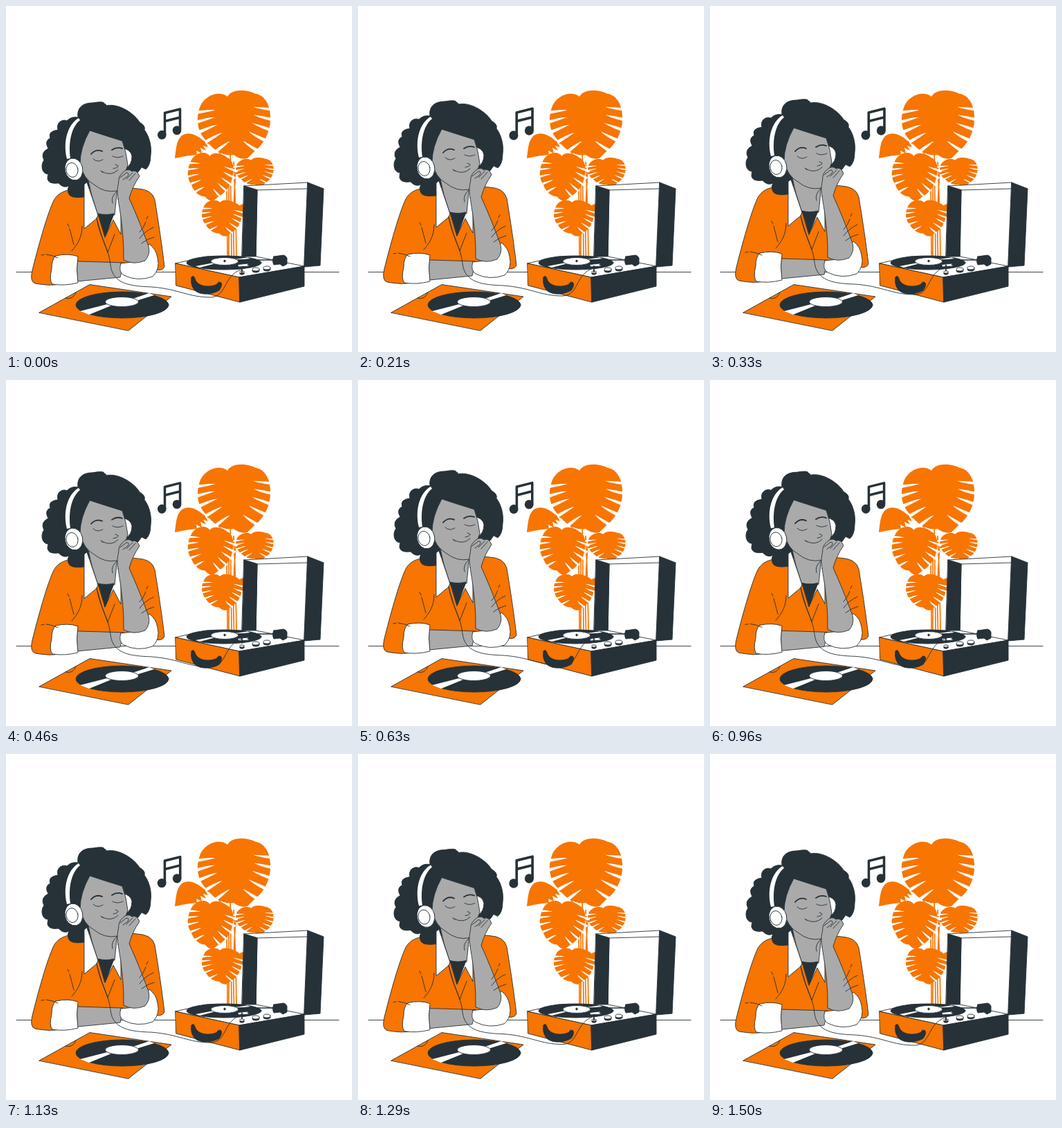
These frames come from a looping animation (500 by 500 pixels, 1540 ms). An HTML page:

```html
<!DOCTYPE html>
<html lang="en">
<head>
<meta charset="utf-8">
<title>Listening to records</title>
<style>
  html, body { margin: 0; width: 100%; height: 100%; overflow: hidden; background: #fff; }
  svg { display: block; width: 100%; height: 100%; }
  .ink { fill: #263238; }
  .white { fill: #fff; }
  .orange { fill: #f77500; }
  .skin { fill: #aaa; }
  .line { fill: none; }
  .art { stroke: #263238; stroke-width: .9; stroke-linejoin: round; stroke-linecap: round; }
  .plain { stroke: none; }
  .stem { fill: none; stroke: #f77500; stroke-width: 1.7; }
</style>
</head>
<body>
<svg viewBox="0 0 500 500">
  <g id="plant">
    <path class="stem" d="M324 205Q325 290 326 362M318 225Q320 290 320 362M329 225Q332 290 333 362M332 240Q327 300 329.500 362M322 250V362M282 195Q303 199 312 218"/>
    <path class="orange" d="M244 220C246 206 246 192 256 186Q265 182 274 187Q287 193 292 204L285 202L289 209L281 205L283 213L275 209L276 215Q262 216 244 220ZM335 289L345 285V307Q337 304 335 289Z"/>
  </g>

  <g class="art">
    <path class="line" d="M15 384.500H481"/>

    <g id="turntable">
      <path class="white" d="M344 260L436 255V264L431 377L361 366L363 266Z"/>
      <path class="line" d="M363 266L436 264"/>
      <path class="ink" d="M344 260L363 266L361 367L341 364ZM436 255L459 264L454 375L431 377Z"/>
      <path class="white" d="M245 372L337 392L431 376L361 362H290Z"/>
      <path class="orange" d="M245 372L337 392L338 428L246 404Z"/>
      <path class="ink" d="M337 392L431 376V405L338 428Z"/>
      <ellipse class="ink" cx="315" cy="371" rx="54" ry="10"/>
      <path class="white plain" d="M274 376L300 371L303 372L280 378ZM331 366L349 363.500L353 365L334 367Z"/>
      <ellipse class="white" cx="316" cy="369" rx="20" ry="5.500"/>
      <ellipse class="ink" cx="316" cy="368.500" rx="1.200" ry="1.500"/>
      <path class="white" d="M335 373.500L350 372L351 376L336 377Z"/>
      <path class="line" stroke-width="1.300" d="M349 374L366 367L388 367M335 367H388"/>
      <path class="ink" d="M387 362L401 360Q407 362 406 367V373L400 376L396 373L387 374Q384 368 387 362Z"/>
      <g id="knobs"></g>
      <path class="ink" d="M268 392Q271 388 273 394C276 405 293 408 305 402Q307 397 311 400Q313 404 308 411C296 418 279 418 272 410Q266 402 268 392Z"/>
    </g>

    <g id="cover">
      <path class="orange" d="M48 443L121 402.500L239 420L177 469Z"/>
      <path class="line" d="M86 422Q97 425 101 414"/>
      <ellipse class="ink" cx="168" cy="432" rx="67" ry="19"/>
      <path class="white plain" d="M107 441L146 431L152 433L120 446ZM183 423L207 415L214 418L188 426Z"/>
      <ellipse class="white" cx="167.500" cy="427.500" rx="24" ry="7"/>
    </g>

    <g id="woman">
      <path class="orange" d="M114 265C91 263 76 268 69 281C59 302 46 350 38 382Q34 398 42 401Q65 405 76 402L104 370L168 372L210 380Q225 385 229 377C226 350 220 310 215 280Q211 265 190 264L160 261Z"/>
      <path class="ink" d="M104 161C102 147 111 140 125 140Q142 137 142 141Q145 142 145 144C164 140 187 157 193 168Q202 173 200 179C207 188 211 203 209 216Q209 230 202 236L196 233L191 240L125 256L113 276Q92 279 90 270Q88 265 91 260Q83 264 76 256Q62 258 60 250Q60 246 61 243C51 243 50 228 55 223Q49 212 61 206Q55 195 64 191Q60 181 75 179C72 168 82 163 88 166Q95 159 104 161Z"/>
      <path class="white" d="M169 206Q180 207 182 217Q182 229 174 234Z"/>
      <path class="white" d="M117 255L133 302L131 307L113 322V258ZM160 266L156 300L143 334L155 309L166 330V268Z"/>
      <path class="skin" d="M118 248Q123 275 133 302H157L161 262Z"/>
      <path class="ink" d="M133 300Q144 303 156 300L143 334Z"/>
      <path class="line" d="M131 307Q138 334 147 356L157 330M160 268Q151 276 154 285"/>

      <path class="skin" d="M121 180Q142 187 168 195Q174 211 176 230Q170 249 161 267Q143 271 127 258Q112 250 107 228Q107 205 121 180Z"/>
      <path class="line" stroke-width="1.800" d="M123 214Q130 206 139 210M153 208Q160 203 168 206"/>
      <path class="line" d="M126 221Q132 227 140 222M154 217Q161 221 169 217M155 235Q162 234 162 231L158 229M138 239Q152 247 162 237M137 238L140 241"/>
      <path class="white plain" d="M88 221C82 196 89 171 105 162L107 165C94 175 90 198 93 220Z"/>
      <ellipse class="white" cx="98" cy="236" rx="12.800" ry="16" transform="rotate(-12 98 236)"/>
      <ellipse class="white" cx="95.500" cy="237" rx="8.500" ry="10.500" transform="rotate(-12 95.500 237)"/>

      <path class="skin" d="M103 369L170 371L165 392L103 398Z"/>
      <path class="white" d="M72 361Q90 357 104 362Q101 380 104 400Q84 405 67 402Q62 396 66 380Q66 366 72 361Z"/>
      <path class="white" d="M166 372L184 370L203 350L207 344Q217 351 219 364Q223 380 212 391Q190 399 170 389Q162 384 166 372Z"/>
      <path class="skin" d="M162 279C159 264 163 259 163 250Q164 244 172 238Q178 235 182 239Q189 236 193 246Q183 260 178 278C188 300 198 325 206 347Q209 359 201 368Q184 375 170 367Q171 330 162 279Z"/>
      <path class="line" d="M165 248L174 241Q179 241 176 246L169 251M174 250L183 241M178 252L187 242"/>
      <path class="line" d="M89 315L91 319M92 322L98 345M110 318C110 335 103 345 95 354M51 360L55 359.500M58 359Q67 360 75 364M193 327Q199 321 202 312M203 308L205 304M193 336Q201 325 213 320M196 343Q205 336 214 334"/>

      <path class="line" d="M131 307C136 337 149 351 151 374C154 402 180 405 210 406C250 409 263 421 296 421C318 420 314 394 335 383L341 380"/>
      <path class="line" stroke-width="1.800" d="M341 378V386"/>
    </g>
  </g>

  <g id="note" class="art" style="stroke-width:3.500">
    <path class="line" d="M229.500 186V154.500L251.500 149V179M229.500 166.500L251.500 161"/>
    <ellipse class="ink plain" cx="225.300" cy="186.300" rx="6.300" ry="6.500"/>
    <ellipse class="ink plain" cx="247" cy="179.700" rx="6.300" ry="6.500"/>
  </g>
</svg>
<script>
  const LOOP = 1540, LEAD = 40, RISE = 8.4;
  const $ = id => document.getElementById(id);

  const HEART = 'M-9-41C-20-50-40-44-48-28C-56-8-52 12-38 24C-30 36-14 46 0 43Q10 51 20 48Q26 42 30 38C46 26 54 6 53-12C53-32 42-44 32-45C16-53-4-51-9-41Z';

  // A tapered cut from the leaf's edge, bending towards its midrib
  function cut(x, y, length, angle, width) {
    return `<path class="white" transform="translate(${x} ${y}) rotate(${angle})"
      d="M-8 ${-width}Q${length * .7} ${-width} ${length} 0Q${length * .5} ${width * .4} -8 ${width}Z"/>`;
  }

  function leaf(x, y, sx, sy, turn) {
    let cuts = '';
    for (let i = 0; i < 5; i++) {
      const reach = 26 - i * 2;
      cuts += cut(-52 + i * i * 2, -18 + i * 13, reach, -8 - i * 7, 2.5);
      cuts += cut(54 - i * i * 1.6, -23 + i * 14, reach, 187 + i * 7, 2.5);
    }
    $('plant').insertAdjacentHTML('beforeend',
      `<g transform="translate(${x} ${y}) rotate(${turn}) scale(${sx} ${sy})">
        <path class="orange" d="${HEART}"/>${cuts}</g>`);
  }
  leaf(359, 240, .52, .42, 0);
  leaf(311, 306, .55, .53, 8);
  leaf(294, 246, .62, .7, 12);
  leaf(329, 172, 1, 1, 0);

  for (const [x, y, r] of [[341, 385, 3.3], [361, 381, 5], [377, 379, 5]])
    $('knobs').insertAdjacentHTML('beforeend',
      `<ellipse class="ink" cx="${x}" cy="${y + 1.5}" rx="${r}" ry="${r / 2}"/>
       <ellipse class="white" cx="${x}" cy="${y - .5}" rx="${r}" ry="${r / 2}"/>`);

  function draw(now) {
    const wave = (waves, time) => Math.sin(Math.PI * waves * time / LOOP) ** 2;
    const lift = RISE * wave(1, now + LEAD);
    const pulse = 1 + .04 * wave(3, now);
    $('woman').setAttribute('transform', `translate(0 ${-lift})`);
    $('note').setAttribute('transform', `translate(236 170) scale(${pulse}) translate(-236 -170)`);
    requestAnimationFrame(draw);
  }
  draw(performance.now());
</script>
</body>
</html>
```
